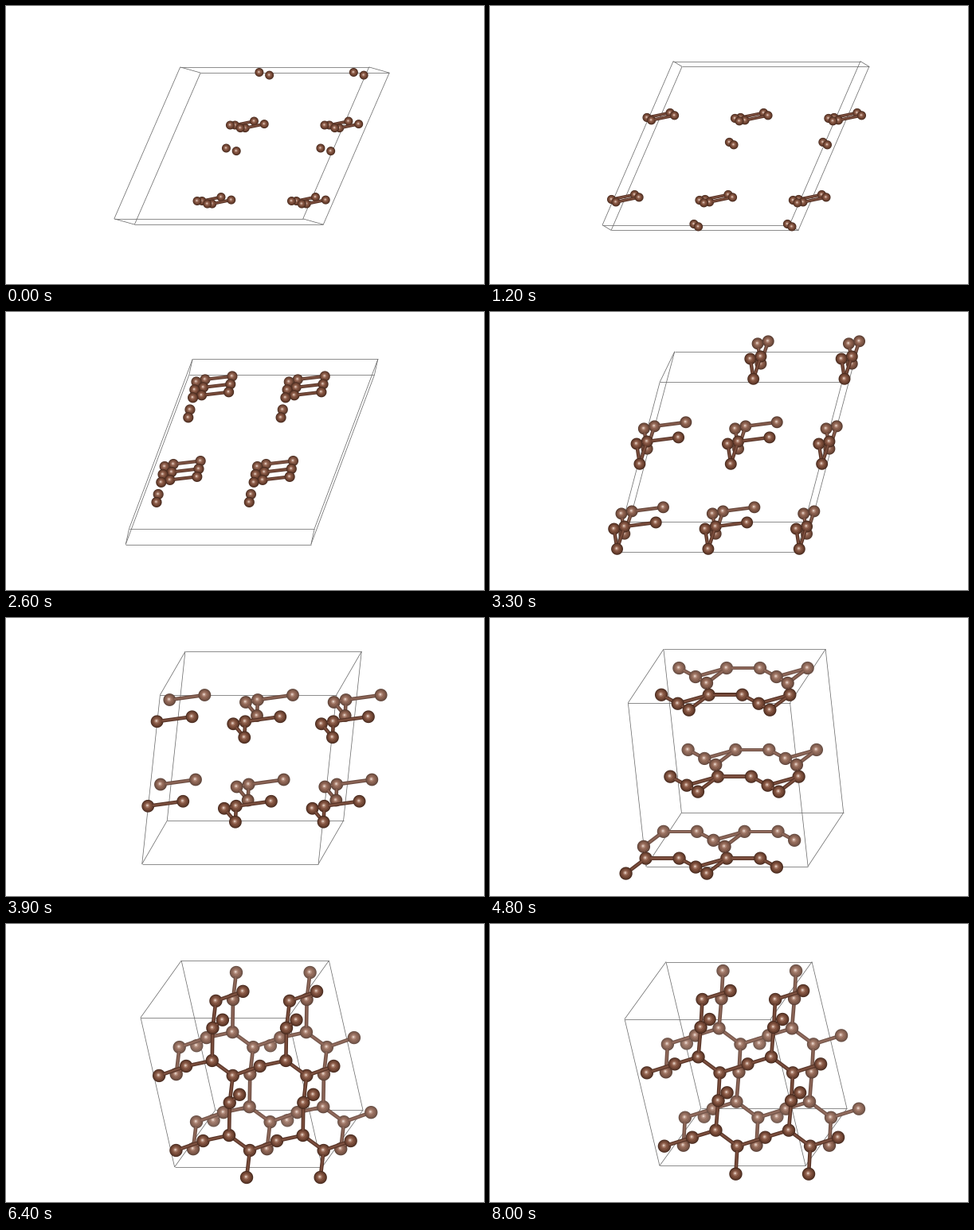
Recreate the animation shown at these times as a matplotlib script. Size 600 px wide and 350 px high, loop 8100 ms.

```python
from itertools import product

import matplotlib.pyplot as plt
import numpy as np
from matplotlib.animation import FuncAnimation
from matplotlib.collections import LineCollection, PolyCollection

W, H, DPI = 600, 350, 100
FRAMES, INTERVAL = 81, 100
CENTER = np.array([308.5, 176.0])
SHEETS = range(46, 55)  # frames in which three flat layers are shown

# Key points of the anchor atom T and of its neighbours relative to it
MOMENTS = [0, 12, 26, 39, 48, 64, 80]
PATHS = {
    "T": [(246, 245.5), (270, 243.5), (326.5, 191.5), (316, 103),
          (297, 63), (289, 61), (292.5, 59)],
    "A": [(24, -5), (29, -6), (34, -4), (44, -6), (42, 0), (34, -12), (35, -11)],
    "B": [(-6, 0), (-7, 1), (-11, 3), (-15, 3), (-39, 11), (-26, -19), (-27, -20)],
    "D": [(-11, 29), (-14, 31), (-19, 38), (-1, 20), (-25, 19), (-4, 34), (-2, 35)],
}

# first atom, second atom, lattice step to the second, frames
BONDS = [
    ("T", "A", (0, 0, 0), range(0, 81)), ("T", "B", (0, 0, 0), range(0, 81)),
    ("T", "D", (0, 0, 0), range(33, 81)), ("B", "D", (0, 0, 0), range(33, 55)),
    ("A", "B", (1, 0, 0), range(46, 81)), ("D", "T", (0, 1, 0), SHEETS),
    ("D", "B", (0, 0, 1), range(55, 81)), ("D", "A", (0, 1, 0), range(55, 81)),
]

DEPTH = {"T": 0.0, "A": 0.02, "B": 0.1, "D": 0.35}
ATOM_SHADES = [(1.0, (72, 42, 30)), (0.86, (104, 63, 46)), (0.64, (128, 81, 62)),
               (0.38, (162, 117, 98)), (0.18, (216, 190, 177))]
BOND_SHADES = [(1.0, (86, 50, 37)), (0.5, (122, 77, 60))]

angles = np.linspace(0, 2 * np.pi, 28, endpoint=False)
CIRCLE = np.column_stack([np.cos(angles), np.sin(angles)])


def step(frame, middle, width):
    return 1 / (1 + np.exp((middle - frame) / width))


def cell_at(frame):
    """Edges a, b, c on screen: an early relaxation, then a smooth change."""
    relax = np.exp(-frame / 8)
    a = (234.5 + 2.5 * relax - 51.5 * step(frame, 45.4, 6), 0)
    b = (10 + 16 * relax - 62 * step(frame, 34, 7),
         4.5 + 2.5 * relax + 67.5 * step(frame, 33, 5.7))
    c = (-92 + 9 * relax + 136 * step(frame, 38.8, 5.5),
         218.5 - 27.5 * np.exp(-frame / 15) - 34 * step(frame, 52, 6))
    return np.array([a, b, c])


def basis_at(frame):
    points = {name: np.array([np.interp(frame, MOMENTS, axis) for axis in zip(*path)])
              for name, path in PATHS.items()}
    return {name: p if name == "T" else points["T"] + p
            for name, p in points.items()}


def fraction(name, p, cell, frame):
    """Coordinates in units of the half cell; the sheet passes the back face."""
    v = 0.5
    if name != "D":
        v *= np.clip((abs(frame - 26) - 4) / 8, 0, 1)
    origin = CENTER - cell.sum(axis=0) / 2
    a, b, c = cell / 2
    x, y = p - origin - v * b
    w = y / c[1]
    return np.array([(x - w * c[0]) / a[0], v, w])


def neighbours(key, frame):
    name, ijk = key
    for first, second, shift, frames in BONDS:
        if frame in frames:
            if name == first:
                yield second, tuple(np.add(ijk, shift).tolist())
            if name == second:
                yield first, tuple(np.subtract(ijk, shift).tolist())


def visible_atoms(frame, cell, basis):
    """Every periodic image inside the cell, completed by its bonded atoms."""
    shown = set()
    for name, p in basis.items():
        f = fraction(name, p, cell, frame)
        low, high = np.ceil(-f).astype(int), np.floor(2 - f).astype(int)
        if frame in SHEETS:
            low[2], high[2] = 0, 2
        spans = [range(lo, hi + 1) for lo, hi in zip(low, high)]
        for i, j, k in product(*spans):
            if frame in SHEETS and k == 2 and name in "TD":
                i -= 1  # the lowest layer is cut one period further left
            shown.add((name, (i, j, k)))
    if frame not in SHEETS:
        shown |= {other for key in shown for other in neighbours(key, frame)}
    return shown


def cell_edges(cell):
    origin = CENTER - cell.sum(axis=0) / 2
    for axis in range(3):
        u, v = (cell[n] for n in range(3) if n != axis)
        for s, t in product((0, 1), repeat=2):
            start = origin + s * u + t * v
            yield [start, start + cell[axis]]


def faded(rgb, depth, strength):
    mix = strength * np.clip((1.1 - depth) / 1.4, 0, 1)
    return np.array(rgb) / 255 * (1 - mix) + mix


def atom_shapes(p, r, depth, strength):
    for size, rgb in ATOM_SHADES:
        middle = p - 0.12 * r * (1 - size)
        yield middle + CIRCLE * r * size, faded(rgb, depth, strength)


def bond_shapes(p, q, r, depth, strength):
    length = np.hypot(*(q - p))
    if length < 1.4 * r:
        return
    along = (q - p) / length
    normal = np.array([-along[1], along[0]])
    p, q = p + along * 0.7 * r, q - along * 0.7 * r
    for size, rgb in BOND_SHADES:
        side = normal * (1.1 + 0.15 * r) * size
        yield (np.array([p + side, q + side, q - side, p - side]),
               faded(rgb, depth, strength))


def solid_shapes(frame, cell):
    basis = basis_at(frame)
    radius = 5.5 + 2.7 * step(frame, 28, 5)
    strength = 0.22 * step(frame, 33, 5.7)
    shown = visible_atoms(frame, cell, basis)
    place = {key: basis[key[0]] + np.array(key[1]) @ cell / 2 for key in shown}
    depth = {key: key[1][1] + DEPTH[key[0]] for key in shown}

    items = []
    for key in sorted(shown):
        items.append((depth[key], atom_shapes(place[key], radius, depth[key], strength)))
        for other in neighbours(key, frame):
            if other in shown and key < other:
                d = (depth[key] + depth[other]) / 2
                items.append((d - 0.005, bond_shapes(place[key], place[other],
                                                     radius, d, strength)))
    items.sort(key=lambda item: item[0])
    return [shape for _, group in items for shape in group]


fig = plt.figure(figsize=(W / DPI, H / DPI), dpi=DPI, facecolor="white")
ax = fig.add_axes([0, 0, 1, 1])
ax.set(xlim=(0, W), ylim=(H, 0))
ax.axis("off")
outline = LineCollection([], colors="#6c6c6c", linewidths=0.55, zorder=1)
solids = PolyCollection([], linewidths=0, zorder=2)
ax.add_collection(outline, autolim=False)
ax.add_collection(solids, autolim=False)


def draw(frame):
    cell = cell_at(frame)
    shapes = solid_shapes(frame, cell)
    outline.set_segments(list(cell_edges(cell)))
    solids.set_verts([verts for verts, _ in shapes])
    solids.set_facecolor([color for _, color in shapes])
    return outline, solids


anim = FuncAnimation(fig, draw, frames=FRAMES, interval=INTERVAL,
                     repeat=True, repeat_delay=0)
plt.show()
```
